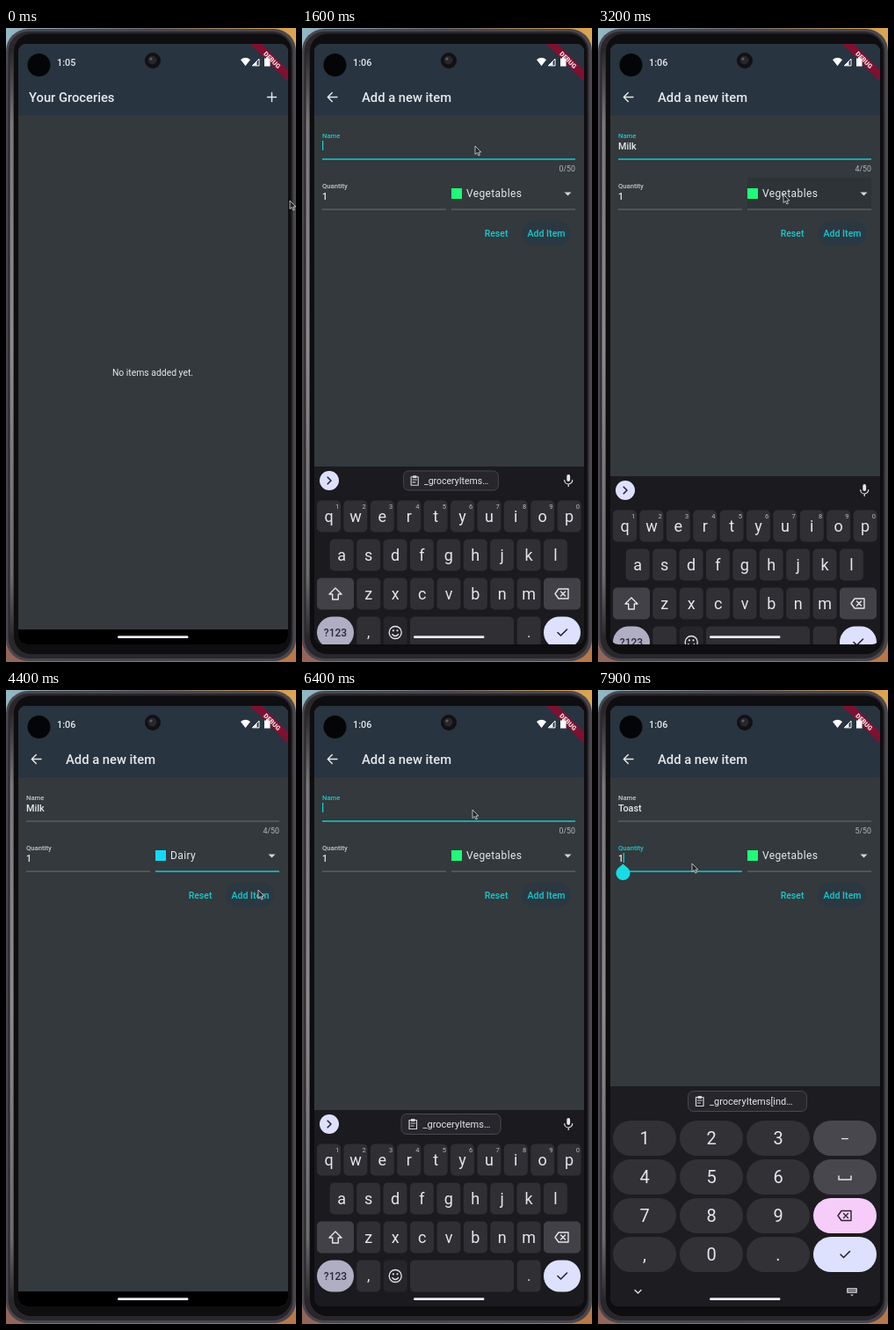
An HTML page that plays this animation: 330 px wide and 720 px high, repeating every 8 s.

```html
<!DOCTYPE html>
<html lang="en">
<head>
<meta charset="utf-8">
<title>Groceries app</title>
<style>
  html, body { margin: 0; width: 100%; height: 100%; overflow: hidden; background: #1a191c; }
  svg { display: block; width: 330px; height: 720px; }
  text { font-family: Roboto, "Noto Sans", sans-serif; white-space: pre; }
  .wide { letter-spacing: .37px; }
</style>
</head>
<body>
<script>
const LOOP = 8000, STEP = 100;
const CYAN = '#18c9cf', INK = '#e6e9eb', GREY = '#74797c', SOFT = '#c3c8ca', PALE = '#dee1fe';
const NS = 'http://www.w3.org/2000/svg';

// ---------- drawing helpers ----------
function el(tag, attrs, parent) {
  const e = document.createElementNS(NS, tag);
  set(e, attrs);
  if (parent) parent.append(e);
  return e;
}
function set(e, attrs) {
  for (const k in attrs) e.setAttribute(k, attrs[k]);
}
const group = (parent, attrs = {}) => el('g', attrs, parent);
const rect = (p, x, y, width, height, fill, rx = 0, more = {}) =>
  el('rect', { x, y, width, height, fill, rx, ...more }, p);
const disc = (p, cx, cy, r, fill) => el('circle', { cx, cy, r, fill }, p);
const fillPath = (p, d, fill) => el('path', { d, fill }, p);
const linePath = (p, d, stroke, w = 1.4) =>
  el('path', { d, stroke, fill: 'none', 'stroke-width': w, 'stroke-linejoin': 'round', 'stroke-linecap': 'round' }, p);
function label(p, str, x, y, size, fill = INK, weight = 400, anchor = 'start') {
  const t = el('text', { x, y, fill, 'font-size': size, 'font-weight': weight, 'text-anchor': anchor }, p);
  t.textContent = str;
  return t;
}
const mid = (p, str, x, y, size, fill, weight) => label(p, str, x, y, size, fill, weight, 'middle');
const show = (e, on) => set(e, { visibility: on ? 'inherit' : 'hidden' });

// ---------- motion helpers ----------
const clamp = v => Math.min(1, Math.max(0, v));
const ease = v => v * v * (3 - 2 * v);
const out = v => 1 - (1 - v) ** 3;
const span = (t, a, d) => clamp((t - a) / d);
const within = (t, a, b) => t >= a && t < b;

// Rows are [time, ...values].
function track(rows, t, curve = v => v) {
  let i = 0;
  while (i < rows.length - 2 && t >= rows[i + 1][0]) i++;
  const [a, b] = [rows[i], rows[i + 1]];
  const f = curve(span(t, a[0], b[0] - a[0]));
  return a.slice(1).map((v, k) => v + (b[k + 1] - v) * f);
}
const zoom = s => `translate(167.5 359) scale(${s}) translate(-167.5 -359)`;

// ---------- phone ----------
const svg = el('svg', { viewBox: '0 0 330 720' }, document.body);
const defs = el('defs', {}, svg);
const clip = el('clipPath', { id: 'screen' }, defs);
rect(clip, 14, 18, 307, 682, '#fff', 9);
function gradient(id, dir, stops) {
  const g = el('linearGradient', { id, x1: 0, y1: 0, ...dir }, defs);
  stops.forEach(([offset, c]) => el('stop', { offset, 'stop-color': c }, g));
}
gradient('wallTop', { x2: 1, y2: 0 }, [[0, '#93b9c6'], [0.5, '#6d6a70'], [1, '#dda650']]);
gradient('wallEnd', { x2: 1, y2: 0 }, [[0, '#93655a'], [1, '#b97848']]);
gradient('rim', { x2: 0, y2: 1 }, [[0, '#2c2a2d'], [0.12, '#79777a'], [0.5, '#8b898b'], [0.9, '#6c696b'], [1, '#2c2a2d']]);

rect(svg, 0, 0, 330, 360, 'url(#wallTop)');
rect(svg, 0, 360, 330, 360, 'url(#wallEnd)');
rect(svg, 0, 1, 330, 718, '#4a464d', 25);
rect(svg, 2.5, 4, 324, 712, '#29272b', 23);
rect(svg, 4.5, 28, 4, 662, 'url(#rim)', 1.5);
rect(svg, 9, 6.5, 315.5, 704.5, '#0e0d0f', 20);

const screen = group(svg, { 'clip-path': 'url(#screen)' });
rect(screen, 14, 18, 307, 682, '#283440');

function page() {
  const g = group(screen);
  rect(g, 14, 18, 307, 682, '#33393c');
  rect(g, 14, 18, 307, 81, '#283440');
  return g;
}
function swatch(p, x, y, size, color) {
  return rect(p, x, y, size, size, color);
}

// ---------- list page ----------
const list = page();
label(list, 'Your Groceries', 26, 84, 14.75, INK, 500);
linePath(list, 'M297.5 78.5h10M302.5 73.5v10', INK, 1.4);
const empty = mid(list, 'No items added yet.', 167, 395, 10.4);
const row = group(list);
swatch(row, 26, 111, 18, '#14d5f4');
label(row, 'Milk', 56, 124, 12);
label(row, '1', 309, 124, 10.5, INK, 400, 'end');

// ---------- form page ----------
const form = page();
linePath(form, 'M40 78.5h-10.5M34.3 73.5l-5 5l5 5', INK, 1.4);
label(form, 'Add a new item', 68, 84, 14.75, INK, 500);

const nameLabel = label(form, 'Name', 0, 0, 7.7, INK, 500);
const nameText = label(form, '', 23, 137.5, 10.8, INK, 500);
const counter = label(form, '', 311, 163, 8.8, '#b3b8ba', 400, 'end');
const countLabel = label(form, 'Quantity', 23, 182, 7.7, INK, 500);
label(form, '1', 23, 195, 10.5, INK, 500);

const press = rect(form, 170, 170, 141, 36, '#2d3336', 2);
const pick = swatch(form, 170, 182, 12, '#1ffa78');
const pickText = label(form, '', 187, 192.3, 12);
set(pickText, { class: 'wide' });
fillPath(form, 'M298.5 186.5h8l-4 4z', '#d3d6d8');

const rule = (x1, x2, y) => el('path', { d: `M${x1} ${y}H${x2}` }, form);
const rules = [rule(23, 311, 149), rule(23, 164, 206), rule(170, 311, 206)];
const light = (r, on) => set(r, { stroke: on ? CYAN : GREY, 'stroke-width': on ? 1.5 : 0.9 });

mid(form, 'Reset', 221, 236.7, 10.5, CYAN, 500);
rect(form, 250, 219, 56, 28, '#2b3842', 14);
mid(form, 'Add Item', 278, 236.7, 10.6, CYAN, 500);

const caret = rect(form, 23, 128, 1.3, 11, CYAN);
const handle = fillPath(form, 'M28.5 197.5L34.3 202.5A8 8 0 1 1 22.7 202.5Z', '#17dce6');

// ---------- category menu ----------
const kinds = [['Vegetables', '#1ffa78'], ['Fruit', '#91ff00'], ['Meat', '#ff6600'], ['Dairy', '#14d9f5'],
  ['Carbs', '#003cff'], ['Sweets', '#ff9500'], ['Spices', '#ffbb00'], ['Convenience', '#bf00ff'],
  ['Hygiene', '#9500ff'], ['Other', '#00e1ff']];
const menu = group(screen);
const menuBox = rect(menu, 158, 164, 163, 372, '#2a333b', 3);
const hover = rect(menu, 158, 170, 163, 36, '#3b444b');
const options = kinds.map(([name, color], i) => {
  const g = group(menu, { class: 'wide' });
  swatch(g, 170, 182 + 36 * i, 12, color);
  label(g, name, 187, 192.3 + 36 * i, 12);
  return g;
});

// ---------- status bar ----------
const clock = label(screen, '', 58, 42.8, 10.8, INK, 500);
disc(screen, 37.5, 42, 13, '#040506');
disc(screen, 167, 37, 9, '#111114');
disc(screen, 166.5, 36.5, 5, '#26262b');
disc(screen, 165, 35, 1.6, '#5c5c63');
fillPath(screen, 'M278 18H291L321 48V61Z', '#7f1030');
fillPath(screen, 'M267 36Q272.5 31.5 278 36L272.5 43Z', '#fff');
linePath(screen, 'M280.5 42.5L288 35V42.5Z', '#fff', 1);
fillPath(screen, 'M280.5 42.5L285.5 37.5V42.5Z', '#fff');
fillPath(screen, 'M294 34.5H296V33H298.5V34.5H300.5V43.5H294Z', '#fff');
mid(group(screen, { transform: 'translate(302.8 36.3) rotate(45)' }), 'DEBUG', 0, 2.6, 7.4, '#f3dfe4', 800);
rect(screen, 14, 683, 307, 17, '#000');

// ---------- keyboards ----------
const KEY = '#2f2f34', SIDE = '#414147', GLYPH = '#e6e5ec';
const check = (p, x, y) => linePath(p, `M${x - 5} ${y}l3.5 3.5l7-7`, '#23233a', 1.6);
function erase(p, x, y, c) {
  linePath(p, `M${x - 8} ${y}l4-5.5h11v11h-11zM${x - 1.5} ${y - 2.5}l5 5m0-5l-5 5`, c, 1.4);
}
function makeChip(parent, cx, cy, w, str) {
  const g = group(parent), x = cx - w / 2;
  rect(g, x, cy - 11.5, w, 23, '#26262b', 6, { stroke: '#48484f', 'stroke-width': 1 });
  linePath(g, `M${x + 9} ${cy - 4.5}h8.5v10h-8.5zM${x + 11} ${cy - 1}h4.5m-4.5 3h3`, '#d2d2da', 1.2);
  rect(g, x + 11, cy - 6, 4.5, 3, '#d2d2da');
  label(g, str, x + 24.5, cy + 3.9, 11, GLYPH);
  return g;
}

const board = group(screen);
rect(board, 14, 477, 307, 260, '#1a1a1f');
disc(board, 31, 493, 11, PALE);
linePath(board, 'M29.2 489.2l3.8 3.8l-3.8 3.8', '#23233a', 1.6);
const chip = makeChip(board, 169.5, 493, 113, '_groceryItems…');
rect(board, 301.3, 486, 3.8, 8, GLYPH, 1.9);
linePath(board, 'M298.7 492.5a4.5 4.5 0 0 0 9 0M303.2 497v2.5', GLYPH, 1.2);

const keys = {};
function key(ch, x, y, w = 27, fill = KEY, rx = 5) {
  keys[ch] = rect(board, x - w / 2, y - 18, w, 36, fill, rx);
}
['qwertyuiop', 'asdfghjkl', 'zxcvbnm'].forEach((chars, r) => {
  [...chars].forEach((ch, i) => {
    const x = [30.5, 45.2, 75.8][r] + 30.4 * i, y = 533.5 + 44 * r;
    key(ch, x, y);
    mid(board, ch, x, y + 6, 18, GLYPH);
    if (r === 0) mid(board, (i + 1) % 10, x + 9.7, y - 8.7, 7.5, '#bdbcc4');
  });
});
key('shift', 38, 621.5, 42, SIDE);
linePath(board, 'M38 615l7 7h-3.7v6h-6.6v-6h-3.7z', GLYPH, 1.4);
key('erase', 296, 621.5, 42, SIDE);
erase(board, 296, 621.5, GLYPH);
key('mode', 38, 665.5, 42, '#b0aec3', 18);
mid(board, '?123', 38, 670, 12, '#292838', 500);
key(',', 75.8, 665.5);
mid(board, ',', 75.8, 671, 17, GLYPH);
key('smile', 106.2, 665.5, 27, '#25252a');
linePath(board, 'M99.2 665.5a7 7 0 1 1 14 0a7 7 0 1 1-14 0M102.8 667.5q3.4 4 6.8 0', GLYPH, 1.3);
disc(board, 103.9, 663.3, 1.1, GLYPH);
disc(board, 108.5, 663.3, 1.1, GLYPH);
key(' ', 182, 665.5, 118);
key('.', 258.2, 665.5);
mid(board, '.', 258.2, 671, 17, GLYPH);
key('done', 296, 665.5, 42, PALE, 18);
check(board, 296, 665.5);

const pad = group(screen);
rect(pad, 14, 450, 307, 250, '#1d1c21');
makeChip(pad, 170, 467, 135, '_groceryItems[ind…');
['123–', '456 ', '789<', ',0.>'].forEach((chars, r) => {
  [...chars].forEach((ch, c) => {
    const x = 53 + 76 * c, y = 509 + 44 * r;
    const fill = ch === '<' ? '#f6cdf8' : ch === '>' ? PALE : c === 3 ? '#48474d' : '#323136';
    rect(pad, x - 36, y - 20, 72, 40, fill, 20);
    if (ch === '<') erase(pad, x, y, '#2c2030');
    else if (ch === '>') check(pad, x, y);
    else if (ch === ' ') linePath(pad, `M${x - 7} ${y - 1}v4h14v-4`, GLYPH, 1.5);
    else mid(pad, ch, x, y + 7, c === 3 ? 16 : 20, GLYPH);
  });
});
linePath(pad, 'M42 681.5l3.5 3.5l3.5-3.5', GLYPH, 1.3);
rect(pad, 283, 679, 12, 6, '#b9b8c0', 1);
linePath(pad, 'M285 681h8m-8 2h8', '#1d1c21', 0.8);
fillPath(pad, 'M287 686.5h4l-2 2z', '#b9b8c0');

rect(screen, 127, 690.3, 80.5, 2.8, '#eceaf2', 1.4);

const cursor = group(svg);
el('path', { d: 'M0 0V9.5L2.3 7.5L3.9 11L5.4 10.3L3.9 7H6.8Z', fill: '#222427', stroke: '#d9dadc', 'stroke-width': 0.8 }, cursor);

// ---------- timeline ----------
const pointer = [[0, 323, 196], [600, 303, 77], [900, 303, 77], [1300, 197, 134], [2700, 197, 134],
  [3100, 211, 189], [3200, 211, 189], [3500, 211, 194], [3900, 205, 291], [4050, 205, 291], [4400, 287, 227],
  [4600, 287, 227], [5100, 303, 77], [5400, 303, 77], [5800, 203, 135], [6100, 194, 136],
  [7200, 194, 136], [7600, 107, 197], [8000, 107, 197]];
const slide = [[1300, 230], [1400, 155], [1500, 68], [1600, 21], [1700, 0], [3100, 0], [3200, 32], [3300, 125],
  [3400, 230], [6000, 230], [6100, 125], [6200, 48], [6300, 12], [6400, 0], [8000, 0]];
const typing = [['Milk', 2000, 200], ['Toast', 6700, 150]];

function render(t) {
  const second = t >= 4900;
  const [word, from, gap] = typing[+second];
  const typed = word.slice(0, t < from ? 0 : Math.floor((t - from) / gap) + 1);
  const onName = within(t, 1300, 3300) || within(t, 6000, 7600);
  const onCount = t >= 7600;

  // pages
  const enter = second ? span(t, 5300, 300) : span(t, 700, 300);
  const leave = within(t, 4600, 4900) ? span(t, 4600, 300) : 0;
  const open = out(enter) * (1 - ease(leave));
  set(form, { opacity: open, transform: zoom(0.85 + 0.15 * open) });
  set(list, { transform: zoom(1 + 0.05 * open) });
  show(form, open > 0);
  show(empty, t < 4500);
  show(row, t >= 4500);
  clock.textContent = t < 1000 ? '1:05' : '1:06';

  // fields
  const lift = ease(second ? span(t, 5900, 200) : span(t, 1250, 200));
  set(nameLabel, { x: 23, y: 132 - 7 * lift, 'font-size': 10.5 - 2.8 * lift, fill: onName ? CYAN : SOFT });
  nameText.textContent = typed;
  counter.textContent = typed.length + '/50';
  set(countLabel, { fill: onCount ? CYAN : SOFT });
  const [kind, color] = kinds[within(t, 4100, 4900) ? 3 : 0];
  pickText.textContent = kind;
  set(pick, { fill: color });
  show(press, within(t, 3100, 3600));
  [onName, onCount, within(t, 3300, 4900)].forEach((on, i) => light(rules[i], on));

  const busy = within(t, from, from + gap * word.length);
  const focus = onCount ? 7600 : second ? 6000 : 1300;
  const blink = busy || Math.floor((t - focus) / 500) % 2 === 0;
  show(caret, blink && (onCount || (onName && !within(t, 3100, 3300))));
  set(caret, onCount ? { x: 28.7, y: 185 } : { x: typed ? 24 + nameText.getComputedTextLength() : 23, y: 128 });
  show(handle, t >= 7700);

  // menu
  const drop = out(span(t, 3200, 300)), fade = 1 - span(t, 4050, 250);
  show(menu, t > 3200 && fade > 0);
  set(menu, { opacity: Math.min(1, drop * 1.5) * fade });
  set(menuBox, { height: 48 + 324 * drop });
  options.forEach((o, i) => set(o, { opacity: span(t, 3200 + i * 22, 150) }));

  // pointer
  const [px, py] = track(pointer, t, ease);
  set(cursor, { transform: `translate(${px} ${py})` });
  set(hover, { y: 170 + 36 * Math.min(9, Math.max(0, Math.floor((py - 170) / 36))) });

  // keyboards
  const [dy] = track(slide, t);
  set(board, { transform: `translate(0 ${dy})` });
  show(board, dy < 225 && t < 7700);
  show(pad, t >= 7700);
  show(chip, !typed);
  const s = 1 - 0.045 * Math.min(1, dy / 21);
  set(chip, { transform: `translate(169.5 493) scale(${s}) translate(-169.5 -493)` });
  const down = busy ? typed.slice(-1).toLowerCase() : '';
  for (const ch in keys) if (/^[a-z]$/.test(ch)) set(keys[ch], { fill: ch === down ? '#57575f' : KEY });
}

const start = performance.now();
function tick() {
  const t = (performance.now() - start) % LOOP;
  render(Math.floor(t / STEP) * STEP);
  requestAnimationFrame(tick);
}
tick();
</script>
</body>
</html>
```
